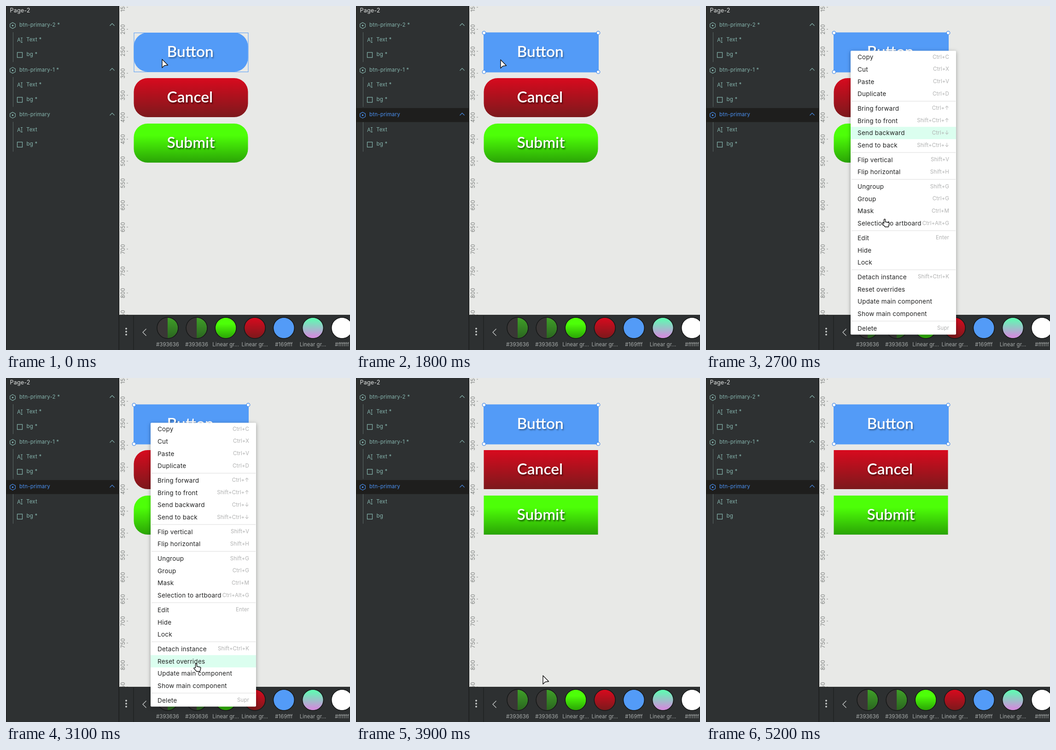
Recreate the animation shown at these times as an HTML page. Size 747x749 px, loop 5.5 s.

```html
<!DOCTYPE html>
<html lang="en">
<head>
<meta charset="utf-8">
<title>Component overrides</title>
<style>
  html, body { margin: 0; width: 100%; height: 100%; overflow: hidden; background: #e8e9e7; }
  svg { display: block; font: 11.5px Inter, sans-serif; letter-spacing: .1px; }
  .layer { letter-spacing: .2px; }
  .item { font-size: 13.5px; letter-spacing: .25px; }
  .label { font: 600 33.5px Lato, sans-serif; letter-spacing: 0; fill: #fff; }
  .menu { filter: drop-shadow(0 2px 4px #0005); }
</style>
</head>
<body>
<svg id="stage" width="747" height="749" viewBox="0 0 747 749"></svg>
<script>
const LOOP = 5500, STEP = 100;
const BLUE = '#539bf7', TEAL = '#86b5ae', ACCENT = '#4a90f0';

const rect = (x, y, w, h, fill, extra = '') =>
  `<rect x="${x}" y="${y}" width="${w}" height="${h}" fill="${fill}" ${extra}/>`;
const circle = (x, y, r, fill, extra = '') =>
  `<circle cx="${x}" cy="${y}" r="${r}" fill="${fill}" ${extra}/>`;
const line = (d, stroke, extra = '') => `<path d="${d}" fill="none" stroke="${stroke}" ${extra}/>`;
const text = (x, y, str, fill, extra = '') => `<text x="${x}" y="${y}" fill="${fill}" ${extra}>${str}</text>`;
const gradient = (id, ...stops) => `<linearGradient id="${id}" x2="0" y2="1">` +
  stops.map(([at, c]) => `<stop offset="${at}" stop-color="${c}"/>`).join('') + '</linearGradient>';

const defs = '<defs>' +
  gradient('red', [0, '#d80a1e'], [1, '#7c191c']) +
  gradient('green', [.3, '#4dff08'], [1, '#2aa305']) +
  gradient('moss', [0, '#3fa028'], [1, '#2b6420']) +
  gradient('pastel', [.1, '#65f5b4'], [.9, '#cf90dc']) + '</defs>';

// Cursor way points: step, x, y
const path = [
  [0, 339, 116], [14, 339, 116], [15, 322, 118], [16, 314, 117], [24, 314, 117],
  [25, 325, 140], [26, 352, 285], [27, 388, 464], [28, 400, 528], [29, 406, 560],
  [30, 410, 574], [31, 413, 622], [32, 409, 638], [33, 406, 645], [36, 406, 645],
  [37, 406, 648], [39, 406, 648], [40, 394, 618], [44, 225, 200], [46, 165, 184],
  [50, 118, 27], [51, 100, 8]
];
const within = (s, from, to) => s >= from && s < to;

function cursor(s) {
  if (s > 51) return '';
  const i = path.findIndex(p => p[0] >= s);
  const [s1, x1, y1] = path[i], [s0, x0, y0] = path[Math.max(0, i - 1)];
  const k = s1 > s0 ? (s - s0) / (s1 - s0) : 1;
  const hand = within(s, 25, 37) || within(s, 44, 51);
  const d = hand
    ? 'M-1.5 9V1.5a1.5 1.5 0 0 1 3 0V6l7 1.5q1.6.5 1.4 2L9 13.5 8 17H1L-5 10.5q-.3-2 2-1.6Z'
    : 'M0 0V18.5L4.8 13.8 12.5 12.8Z';
  return `<path d="${d}" fill="#fff" stroke="#161616" stroke-width="1.4" stroke-linejoin="round"
    transform="translate(${x0 + (x1 - x0) * k} ${y0 + (y1 - y0) * k})"/>`;
}

function ruler() {
  let out = '';
  for (let v = 150; v <= 850; v += 50) {
    const y = 50.7 + (v - 200) * .957;
    out += text(0, 0, v, '#7b7e7c',
      `text-anchor="middle" letter-spacing=".4" transform="translate(258 ${y}) rotate(-90)"`) +
      rect(262, y - .5, 3, 1, '#8d908e');
  }
  return out;
}

function button(y, label, fill, radius, shade) {
  return rect(277.5, y, 248, 85, fill, `rx="${radius}"`) +
    text(349.5, y + 53, label, '#fff', `class="label" style="text-shadow:2px 3px 3px ${shade}"`);
}

function canvas(s) {
  const radius = s < 39 ? 30 : 0;
  let out = button(58, 'Button', BLUE, s < 6 ? 30 : 0, '#0005') +
    button(157, 'Cancel', 'url(#red)', radius, '#0007') +
    button(256, 'Submit', 'url(#green)', radius, '#0008') +
    rect(278, 58.5, 248, 85, 'none', `stroke="${BLUE}" stroke-width="${s < 6 ? 1 : 2}"`);
  if (s >= 18)
    for (const x of [278, 526])
      for (const y of [58.5, 143.5]) out += circle(x, y, 3.7, '#fff', 'stroke="#3c86e8" stroke-width="1.2"');
  return out;
}

// Layer rows are numbered top to bottom, three per component
function hoveredLayer(s) {
  if (within(s, 44, 47)) return 5;
  return { 47: 4, 48: 3, 49: 0 }[s] ?? -1;
}

function layerRow(i, s) {
  const part = i % 3, group = (i - part) / 3;
  const y = 41 + group * 97.6 + part * 32.3;
  const hover = hoveredLayer(s) === i, selected = s >= 18 && i === 6;
  const color = hover ? '#b4dbe8' : selected ? ACCENT : TEAL;
  const ink = hover ? '#1c2b3b' : color;
  const left = part ? 16 : 1;
  let out = hover ? rect(left, y - 14.5, 245 - left, 30.5, '#4a8fdf')
    : selected ? rect(1, y - 14, 244, 30.5, '#1e1e1d') : '';
  if (part === 0) {
    const cy = y + 1.5;
    out += line(`M14.5 ${cy - 6.5}l5.8 3.2v6.6l-5.8 3.2-5.8-3.2v-6.6Z`, ink, 'stroke-width="1.1"') +
      circle(14.5, cy, 1.8, ink) +
      line(`M225.5 ${y + 2}l5-5 5 5`, ink, 'stroke-width="1.2"') +
      text(29, y + 4, 'btn-primary' + ['-2 *', '-1 *', ''][group], color);
  } else if (part === 1) {
    out += text(24, y + 5, 'A', ink) + line(`M32 ${y - 4}h4m-2 0v10m-2 0h4`, ink) +
      text(44, y + 4, group < 2 ? 'Text *' : 'Text', color);
  } else {
    out += rect(24.5, y - 4.5, 11, 11, 'none', `stroke="${ink}" stroke-width="1.2"`) +
      text(44.5, y + 3.5, group < 2 || s < 39 ? 'bg *' : 'bg', color);
  }
  if (hover)
    out += line(`M207 ${y + .5}q5.5-8 11 0q-5.5 8-11 0Z`, ink, 'stroke-width="1.2"') +
      circle(212.5, y + .5, 2, ink) +
      line(`M225.5 ${y}h10v6.5h-10Zm2 0v-3q0-3 3-3t3 2m-3 6v2`, ink, 'stroke-width="1.2"');
  return out;
}

function sidebar(s) {
  let out = rect(0, 0, 245, 749, '#2e3132') + rect(0, 0, 1, 749, '#1b1d1d') + rect(244.5, 0, 1.5, 749, '#1b1d1d') +
    text(8.5, 13.5, 'Page-2', '#e2e4e3', 'font-size="12.5"');
  for (let g = 0; g < 3; g++) out += rect(15, 57 + g * 97.6, 1, 65, '#5b6866');
  for (let i = 0; i < 9; i++) out += layerRow(i, s);
  return `<g class="layer">${out}</g>`;
}

const swatches = [
  ['#393636', '#393636'], ['#393636', '#393636'], ['Linear gr...', 'url(#green)'], ['Linear gr...', 'url(#red)'],
  ['#169fff', BLUE], ['Linear gr...', 'url(#pastel)'], ['#ffffff', '#fff']
];

function palette() {
  let out = rect(245, 673, 502, 76, '#2d3031') + rect(245, 672.5, 502, 1.5, '#161818') + rect(276.5, 673, 1, 76, '#191b1b') +
    line('M304.5 703l-7.5 7.5 7.5 7.5', '#c4c7c6', 'stroke-width="1.3"');
  for (const y of [702.5, 709, 715.5]) out += circle(261, y, 1.9, '#c4c7c6');
  swatches.forEach(([name, fill], i) => {
    const x = 351 + i * 63.1;
    out += circle(x, 701, 22.5, fill);
    if (i < 2) out += `<path d="M${x} 678.5a22.5 22.5 0 0 1 0 45Z" fill="url(#moss)"/>`;
    out += circle(x, 701, 23, 'none', 'stroke="#171919" stroke-width="1.6"') +
      text(x, 740.5, name, '#a9adac', 'text-anchor="middle" font-size="11.3"');
  });
  return out;
}

const menuGroups = [
  'Copy|Ctrl+C,Cut|Ctrl+X,Paste|Ctrl+V,Duplicate|Ctrl+D',
  'Bring forward|Ctrl+↑,Bring to front|Shift+Ctrl+↑,Send backward|Ctrl+↓,Send to back|Shift+Ctrl+↓',
  'Flip vertical|Shift+V,Flip horizontal|Shift+H',
  'Ungroup|Shift+G,Group|Ctrl+G,Mask|Ctrl+M,Selection to artboard|Ctrl+Alt+G',
  'Edit|Enter,Hide|,Lock|',
  'Detach instance|Shift+Ctrl+K,Reset overrides|,Update main component|,Show main component|',
  'Delete|Supr'
].map(group => group.split(',').map(item => item.split('|')));

function hoveredItem(s) {
  if (s >= 32) return 'Update main component';
  return { 25: 'Copy', 26: 'Cut', 27: 'Send backward', 28: 'Selection to artboard',
    29: 'Lock', 30: 'Detach instance', 31: 'Reset overrides' }[s];
}

function menu(s) {
  if (!within(s, 22, 39)) return '';
  let out = rect(314, 97.5, 229, 618, '#fff', 'rx="2" class="menu"'), y = 111.3;
  menuGroups.forEach((group, g) => {
    if (g) {
      out += rect(316, y - 11.4, 226, 1, '#dcdcdc');
      y += 4.9;
    }
    for (const [name, keys] of group) {
      if (name === hoveredItem(s)) out += rect(314, y - 13.4, 229, 26.8, '#dbfeef');
      out += text(329, y + 4.8, name, '#202121', 'class="item"') +
        text(528, y + 3.3, keys, '#b0b1b1', 'text-anchor="end"');
      y += 26.72;
    }
  });
  return out;
}

const stage = document.getElementById('stage');
let shown = -1;

function frame() {
  const s = Math.floor(performance.now() % LOOP / STEP);
  if (s !== shown) {
    shown = s;
    stage.innerHTML = defs + ruler() + canvas(s) + palette() + sidebar(s) + menu(s) + cursor(s);
  }
  requestAnimationFrame(frame);
}
frame();
</script>
</body>
</html>
```
